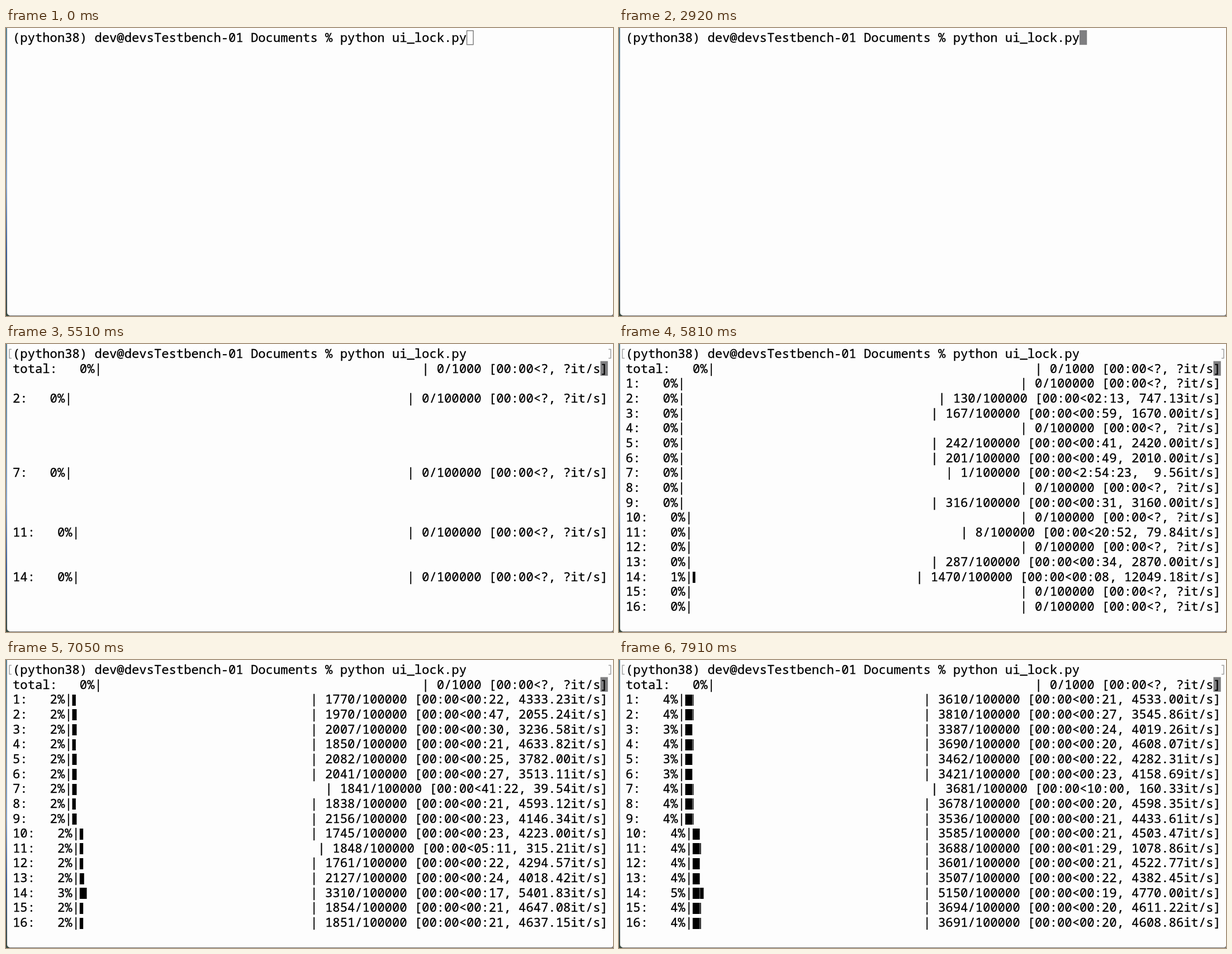
Animation of 1086x516 px, one loop 8000 ms. Source, as an HTML page with a canvas:

```html
<!DOCTYPE html>
<html lang="en">
<head>
<meta charset="utf-8">
<title>Terminal progress bars</title>
<style>
  html, body { margin: 0; width: 100%; height: 100%; overflow: hidden; background: #fdfdfd; }
  canvas { display: block; }
</style>
</head>
<body>
<canvas id="stage" width="1086" height="516"></canvas>
<script>
const ctx = document.getElementById('stage').getContext('2d');
const LOOP = 8000, COLS = 80, LEFT = 12, TOP = 4, CELL_W = 13.31, CELL_H = 26.65;
const PROMPT = '(python38) dev@devsTestbench-01 Documents % python ui_lock.py';
const FOCUS = 1660, FADE_IN = 2640, ENTER = 3640, TOTAL_SHOWN = 4530, OUTPUT = 5250;

// A bar refreshes every INTERVAL seconds of program time, shown slowed down.
const INTERVAL = 0.1, PERIOD = 280, STEP = 460, SMOOTHING = 0.3;

const cellX = col => LEFT + col * CELL_W;
const cellY = row => TOP + row * CELL_H;

// The first refresh of a bar: its time on stage, count and seconds since the bar began.
function makeBar(firstAt, count, elapsed = INTERVAL) {
  const start = Math.max(OUTPUT, firstAt - elapsed / INTERVAL * PERIOD);
  return { firstAt, count, elapsed, start };
}
const early = (...args) => makeBar(5670, ...args);
const middle = count => makeBar(5810, count);
const late = count => makeBar(5950, count);
const bars = [
  late(390), early(130, 0.174), middle(167), late(470),
  middle(242), middle(201), early(1, 0.10464), late(458),
  middle(316), late(365), early(8, 0.1002), late(381),
  middle(287), early(1470, 0.122), late(474), late(471),
];

// Steady counting; the time per item is an exponential moving average.
function progress(bar, t) {
  const update = Math.floor((t - bar.firstAt) / PERIOD);
  if (update < 0) return [0, 0];
  const steady = INTERVAL / STEP, first = bar.elapsed / bar.count;
  const perItem = steady + (first - steady) * (1 - SMOOTHING) ** update;
  return [bar.count + STEP * update, 1 / perItem];
}

function clock(seconds) {
  const s = Math.floor(seconds), pad = v => String(v).padStart(2, '0');
  const hours = Math.floor(s / 3600);
  return (hours ? hours + ':' : '') + pad(Math.floor(s / 60) % 60) + ':' + pad(s % 60);
}

function write(text, row, col = 0) {
  const baseline = Math.round(cellY(row) + 21);
  [...text].forEach((ch, i) => {
    if (ch === ' ') return;
    const x = cellX(col + i + 0.5);
    ctx.fillText(ch, x, baseline);
    ctx.strokeText(ch, x, baseline);
  });
}

function drawBar(label, row, n, total, rate) {
  const head = `${label}: ${String(Math.round(100 * n / total)).padStart(3)}%|`;
  const eta = rate ? clock((total - n) / rate) : '?';
  const speed = rate ? rate.toFixed(2).padStart(5) : '?';
  const tail = `| ${n}/${total} [00:00<${eta}, ${speed}it/s]`;
  const room = COLS - head.length - tail.length;
  write(head, row);
  write(tail, row, COLS - tail.length);
  const eighths = Math.floor(n / total * room * 8);
  for (let done = 0; done < eighths; done += 8) {
    const part = Math.min(8, eighths - done) / 8;
    const x = cellX(head.length + done / 8);
    ctx.fillRect(x, Math.round(cellY(row) + 4.5), part * (CELL_W - 0.6), 20);
  }
}

function cursorOpacity(t) {
  if (t >= OUTPUT) return 1;
  const fade = at => Math.min(1, Math.max(0, (t - at) / 280));
  return 1 - fade(FOCUS) + fade(FADE_IN) - fade(TOTAL_SHOWN);
}

function drawCursor(t) {
  const [row, col] = t < ENTER ? [0, PROMPT.length] : t < TOTAL_SHOWN ? [1, 0] : [1, COLS - 1];
  const x = cellX(col), y = cellY(row);
  if (t < FOCUS) {
    ctx.strokeStyle = '#7f7f7f';
    ctx.lineWidth = 1.5;
    ctx.strokeRect(x + 0.6, y + 0.75, CELL_W - 1.8, 25);
    return;
  }
  ctx.globalAlpha = cursorOpacity(t);
  ctx.fillStyle = '#7f7f81';
  ctx.fillRect(x, y, CELL_W, 26.2);
  ctx.globalAlpha = 1;
}

// Thin brackets at both ends of the submitted command.
function drawMarks() {
  ctx.strokeStyle = '#a0a0a0';
  ctx.lineWidth = 1.5;
  for (const [x, tip] of [[6, 10], [1082, 1078]]) {
    ctx.beginPath();
    ctx.moveTo(tip, 9.5);
    ctx.lineTo(x, 9.5);
    ctx.lineTo(x, 25.5);
    ctx.lineTo(tip, 25.5);
    ctx.stroke();
  }
}

function drawWindow() {
  const edge = ctx.createLinearGradient(0, 0, 0, 516);
  edge.addColorStop(0, '#5c8294');
  edge.addColorStop(0.55, '#86a4cc');
  edge.addColorStop(0.78, '#3a5c94');
  edge.addColorStop(1, '#38483f');
  ctx.fillStyle = edge;
  ctx.fillRect(0, 0, 1086, 516);
  ctx.fillStyle = '#6a6a6a';
  ctx.fillRect(6, 510, 1080, 6);
  ctx.fillStyle = '#fdfdfd';
  ctx.beginPath();
  ctx.roundRect(2, -10, 1084, 525, [0, 0, 4, 5]);
  ctx.fill();
}

function draw(t) {
  drawWindow();
  drawCursor(t);
  ctx.fillStyle = ctx.strokeStyle = '#000';
  ctx.lineWidth = 0.35;
  ctx.lineJoin = 'round';
  ctx.font = '500 22.1px "Noto Sans Mono", "DejaVu Sans Mono", monospace';
  ctx.textAlign = 'center';
  write(PROMPT, 0);
  if (t >= TOTAL_SHOWN) drawBar('total', 1, 0, 1000, 0);
  bars.forEach((bar, i) => {
    if (t < bar.start) return;
    const [n, rate] = progress(bar, t);
    drawBar(i + 1, i + 2, n, 100000, rate);
  });
  if (t >= ENTER) drawMarks();
}

const began = performance.now();
function tick() {
  draw((performance.now() - began) % LOOP);
  requestAnimationFrame(tick);
}
tick();
</script>
</body>
</html>
```
